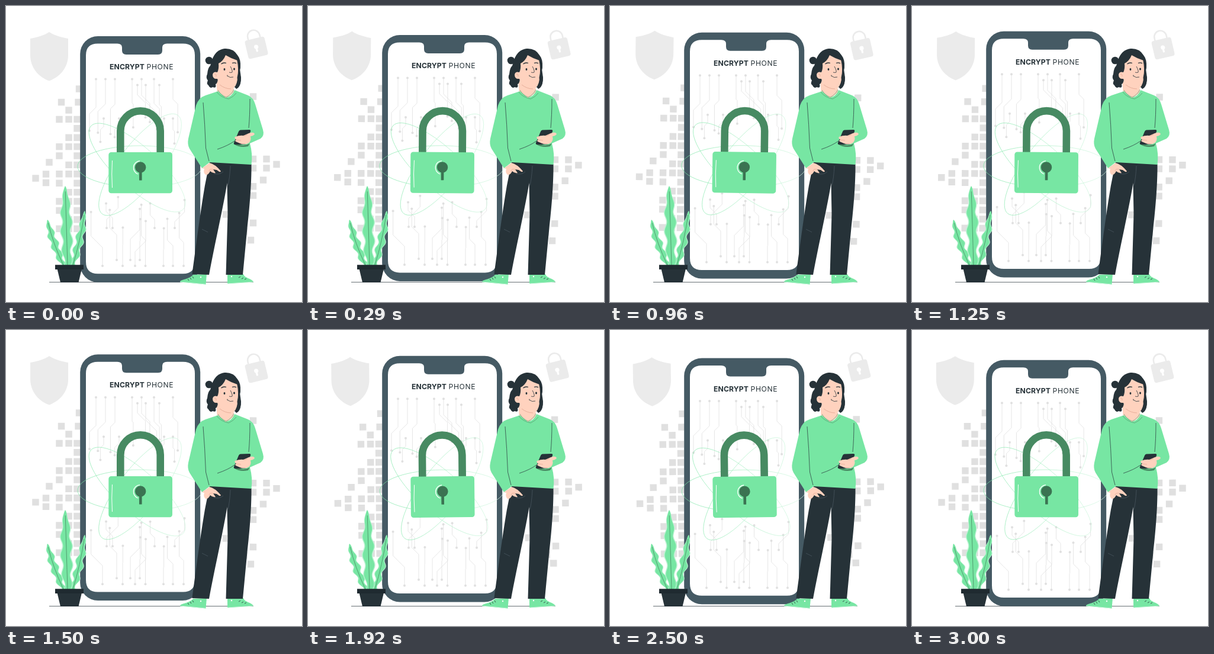
Recreate the animation shown at these times as an HTML page with a canvas. Size 500 px wide and 500 px high, loop 3040 ms.

```html
<!DOCTYPE html>
<html lang="en">
<head>
<meta charset="utf-8">
<title>Encrypt phone</title>
<style>
html, body { margin: 0; width: 100%; height: 100%; overflow: hidden; background: #fff; }
canvas { display: block; width: 500px; height: 500px; }
</style>
</head>
<body>
<canvas id="stage"></canvas>
<script>
const LOOP = 3040;
const GREEN = '#77e6a3', DEEP = '#478a62', PALE = '#bdf3d3', DARK = '#263238', FRAME = '#455a64';
const GREY = '#e0e0e0', LIGHT = '#ebebeb', SKIN = '#ffd2be', FOLD = '#dda08c', WHITE = '#fff';

const canvas = document.getElementById('stage');
const ctx = canvas.getContext('2d');
const ratio = window.devicePixelRatio || 1;
canvas.width = canvas.height = 500 * ratio;

function fill(d, color) {
  ctx.fillStyle = color;
  ctx.fill(new Path2D(d));
}
function line(d, color, width) {
  ctx.strokeStyle = color;
  ctx.lineWidth = width;
  ctx.stroke(new Path2D(d));
}
function dot(x, y, r, color, ry = r) {
  ctx.fillStyle = color;
  ctx.beginPath();
  ctx.ellipse(x, y, r, ry, 0, 0, 7);
  ctx.fill();
}
function box(x, y, w, h, r, color) {
  ctx.fillStyle = color;
  ctx.beginPath();
  ctx.roundRect(x, y, w, h, r);
  ctx.fill();
}
function group(draw, x = 0, y = 0, deg = 0) {
  ctx.save();
  ctx.translate(x, y);
  ctx.rotate(deg * Math.PI / 180);
  draw();
  ctx.restore();
}
// Tilt about the middle of the stage
function tilted(deg, draw) {
  group(() => { ctx.translate(-250, -250); draw(); }, 250, 250, deg);
}

// Seeded random numbers
let seed = 7;
function rand() {
  seed = (seed * 16807) % 2147483647;
  return seed / 2147483647;
}

// Circuit traces: straight, a diagonal jog, straight again
const traces = [];
function wire(y, dir, length, xs) {
  for (const x of xs) {
    const end = Math.min(303, Math.max(141, x + (rand() - 0.5) * 44));
    const y1 = y + dir * length * (0.2 + 0.3 * rand());
    const y2 = y1 + dir * Math.abs(end - x);
    const y3 = y2 + dir * length * (0.2 + 0.3 * rand());
    traces.push({ x, y, end, y3, d: `M${x} ${y}V${y1}L${end} ${y2}V${y3}` });
  }
}
wire(123.5, 1, 100, [152, 168, 184, 213, 229, 250, 282]);
wire(133.5, 1, 70, [222, 236, 259]);
wire(190, 1, 45, [165, 191, 267, 282]);
wire(439, -1, 110, [163, 197, 218, 235.5, 266, 282, 300]);
wire(429, -1, 90, [187, 210, 226]);
wire(375, -1, 45, [170, 180, 251, 285]);

// Background tiles: regular columns with gaps, plus a few strays
const tiles = [
  [123.5, 140], [93.5, 162.5], [122, 162.5], [90, 191.5], [73, 264], [50, 291], [67.5, 284], [67.5, 298.5],
  [417.5, 153], [457, 267.5], [434.5, 294], [371.5, 352], [417.5, 366.5], [402, 381], [413.5, 395.5]
];
for (let i = 0; i < 14; i++) {
  const y = 176 + 15.4 * i;
  if (i > 0) tiles.push([120, y]);
  if (i % 3 !== 2) tiles.push([106, y]);
  if (i > 2 && i % 3 !== 0) tiles.push([90, y]);
}
for (let i = 0; i < 5; i++) {
  const y = 258.5 + 15.4 * i;
  if (i % 3 !== 2) tiles.push([417.5, y]);
  if (i < 2) tiles.push([440, y]);
}

function backdrop() {
  for (const [x, y] of tiles) box(x - 5.7, y - 5.7, 11.4, 11.4, 0, GREY);

  fill('M73 44C64 50 52 53 41 55V83C41 104 55 120 73 126.5C91 120 105 104 105 83V55C94 53 82 50 73 44Z', LIGHT);

  group(() => {
    box(-17, -16, 34, 32, 4, LIGHT);
    line('M-10.3 -15V-20A10.3 10.3 0 0 1 10.3 -20V-15', LIGHT, 2.6);
    dot(0, -1.5, 3.6, WHITE);
    box(-1.6, 0, 3.2, 7, 1, WHITE);
  }, 423, 70.5, -13.5);
}

function label(text, x, font, spacing) {
  ctx.font = font;
  ctx.letterSpacing = spacing;
  ctx.fillText(text, x, 107.3);
}

function phone() {
  box(125.2, 51, 203, 415.8, 30, FRAME);
  fill('M155 63.5H188Q196 63.5 196 70V75Q196 82 203 82H257Q264 82 264 75V70Q264 63.5 272 63.5H299' +
    'Q319 63.5 319 83V432Q319 452.3 299 452.3H155Q135 452.3 135 432V83Q135 63.5 155 63.5Z', WHITE);
  for (const { x, y, end, y3, d } of traces) {
    line(d, GREY, 0.8);
    dot(x, y, 2, GREY);
    dot(end, y3, 2, GREY);
  }
  ctx.fillStyle = DARK;
  label('ENCRYPT', 175, '700 12.2px Inter, sans-serif', '0.1px');
  label('PHONE', 237.5, '400 12.2px Inter, sans-serif', '0.6px');
}

function padlock() {
  const fade = ctx.createLinearGradient(120, 0, 320, 0);
  fade.addColorStop(0, GREEN);
  fade.addColorStop(1, '#d3f7e1');
  ctx.strokeStyle = fade;
  ctx.lineWidth = 0.7;
  for (const [x, y, deg] of [[226, 271, 0], [221.5, 273, 42], [226.5, 268, -52.4]]) {
    ctx.beginPath();
    ctx.ellipse(x, y, 105, 35, deg * Math.PI / 180, 0, 7);
    ctx.stroke();
  }
  line('M193.3 249V211A33.7 33.7 0 0 1 260.7 211V249', DEEP, 12.6);
  box(173.3, 247, 107.7, 69.3, 4.5, GREEN);
  line('M179.5 261Q178 284 179.5 307', WHITE, 1);
  line('M226 261.7A11.5 11.5 0 0 0 223 284', WHITE, 1.3);
  dot(227.2, 272.5, 9.2, '#3b7352');
  box(225, 276, 4.6, 18.5, 0.5, '#3b7352');
}

// Wavy leaf along a quadratic curve
function leaf(base, mid, tip, width, phase) {
  const at = t => [0, 1].map(i =>
    (1 - t) ** 2 * base[i] + 2 * t * (1 - t) * mid[i] + t * t * tip[i]);
  const half = t => (1 - t) ** 0.7 * (0.45 + 1.4 * t) * width;
  const shape = scale => {
    const left = [], right = [];
    for (let i = 0; i <= 50; i++) {
      const t = i / 50, [x, y] = at(t), h = half(t) * scale;
      const wave = 2.2 * Math.sin(t * 26 + phase) * Math.min(1, (1 - t) * 3);
      left.push([x - h + wave, y]);
      right.unshift([x + h + wave, y]);
    }
    return 'M' + left.concat(right).join('L') + 'Z';
  };
  fill(shape(1), PALE);
  fill(shape(0.82), GREEN);
  line(`M${base}Q${mid} ${at(0.93)}`, DEEP, 0.8);
}

function plant() {
  leaf([97, 438], [79, 400], [70, 361], 9.5, 1);
  leaf([113, 438], [126, 395], [133, 346], 9, 3);
  leaf([104, 438], [102, 370], [100, 304], 13, 0);
  fill('M86.5 444H128L122.5 467H92Z', DARK);
  fill('M83 437.3H131V445H83Z', '#1f2a30');
}

function legs() {
  fill('M316 454L339 453L337.5 470.5L294 466C294 462 309 462 316 454Z', GREEN);
  fill('M374 453H401C403 460 415 460 418 466L374 469Z', GREEN);
  line('M294 466L337.5 470M374 469L418 466', PALE, 1.2);
  line('M307 461l2 3M311 459l2 3M315 457l2 3M393 459l3 -2M398 461l3 -2M403 462l3 -1.5', DARK, 0.8);
  dot(329, 458, 1.2, WHITE);
  dot(381, 457, 1.2, WHITE);
  fill('M344 263L414.5 267C415 300 411 345 407.5 375L400 454H371.5L374.5 352L373.5 299' +
    'C368 335 353 400 343 454L314.5 453C320 412 328 350 336 303Z', DARK);
  line('M379 270Q378 290 375 303M331 377L341 382M351 283Q360 286 367 280', '#52616a', 0.6);
}

function torso() {
  fill('M355 126L357 150L371 157L385 146L384 128Z', SKIN);
  fill('M358 144L337 151Q325 155 321 168L308 224Q306 234 310 241L331 274L344 264' +
    'L414.5 268Q417 250 412 232L430 224Q437 219 434 209L421 166Q418 155 409 151L386 142Q382 153 371 155Z', GREEN);
  line('M356 145Q362 154 376 157Q385 153 389 147M358 142Q363 151 372 154Q381 150 385 141', DEEP, 0.6);
  line('M333 163Q336 200 337.5 240L343 262M412 157Q412 185 410 206M357 242Q375 236 386 228', DARK, 0.7);

  fill('M331 274L344 265Q353 267 363 279Q362 282 356 277L350 276L354 282Q349 283 345 279Q340 288 336 284Q333 280 335 275Z', SKIN);
  line('M343 279Q344 274 350 276', FOLD, 0.6);

  fill('M389 231Q400 239 412 232L409 237Q396 240 386 234Z', DEEP);
  fill('M396 209.5L411 209Q414 209 413 212L406 232Q405 234 402 234H387Q384 234 385 231L393 212Q394 209.5 396 209.5Z', DARK);
  fill('M387 221Q395 218 401 219L410 215Q418 212 420 216Q419 219 413 220Q415 228 409 232Q402 235 395 232L388 229Q386 227 389 226Q385 223 387 221Z', SKIN);
  line('M389 226L397 227M401 219Q405 220 408 217', FOLD, 0.6);
}

function head() {
  dot(343, 92, 6.3, DARK);
  fill('M348 91Q354 74 369 72Q384 71 391 83Q397 90 396 104Q394 111 397 121Q397 133 389 140' +
    'Q382 130 370 132L358 124Q357 131 354 132Q356 140 349 137Q345 140 342 134Q338 131 341 126' +
    'Q337 121 340 115Q341 104 345 101Z', DARK);
  fill('M371 83Q381 89 391 92Q394 107 391 124Q389 137 382 140Q372 141 361 133L357 123' +
    'Q349 124 349 116Q350 110 357 112Q360 106 359 97Q367 93 371 83Z', SKIN);
  fill('M390 90Q397 97 395 108Q398 122 396 131Q394 138 389 140Q392 130 390.5 121Q394 108 390 90Z', DARK);
  dot(369, 107, 1.4, DARK, 1.9);
  dot(385.5, 106.5, 1.4, DARK, 1.9);
  line('M363.5 98Q367 95 372 96.5M382 96.5Q386 95 389 97', DARK, 1.3);
  line('M379 102Q383 109 382 112Q380 113 377 112M374 118Q378 122 384 120M374 116.5Q373 118 374.5 119', DARK, 0.8);
  line('M352 115Q355 114 355 119M361 133Q370 140 380 140', FOLD, 0.7);
}

function draw(now) {
  const t = (now % LOOP) / LOOP;
  const lift = -10 * (1 - Math.abs(1 - 2 * t));
  const tilt = t < 0.25 ? 4 * t : t < 0.75 ? 2 - 4 * t : 4 * t - 4;

  ctx.setTransform(ratio, 0, 0, ratio, 0, 0);
  ctx.fillStyle = WHITE;
  ctx.fillRect(0, 0, 500, 500);
  tilted(tilt, backdrop);
  line('M73 466.5H418', DARK, 0.7);
  group(phone, 0, lift);
  tilted(tilt, padlock);
  plant();
  legs();
  torso();
  head();
}

const start = performance.now();
function tick() {
  draw(performance.now() - start);
  requestAnimationFrame(tick);
}
tick();
</script>
</body>
</html>
```
